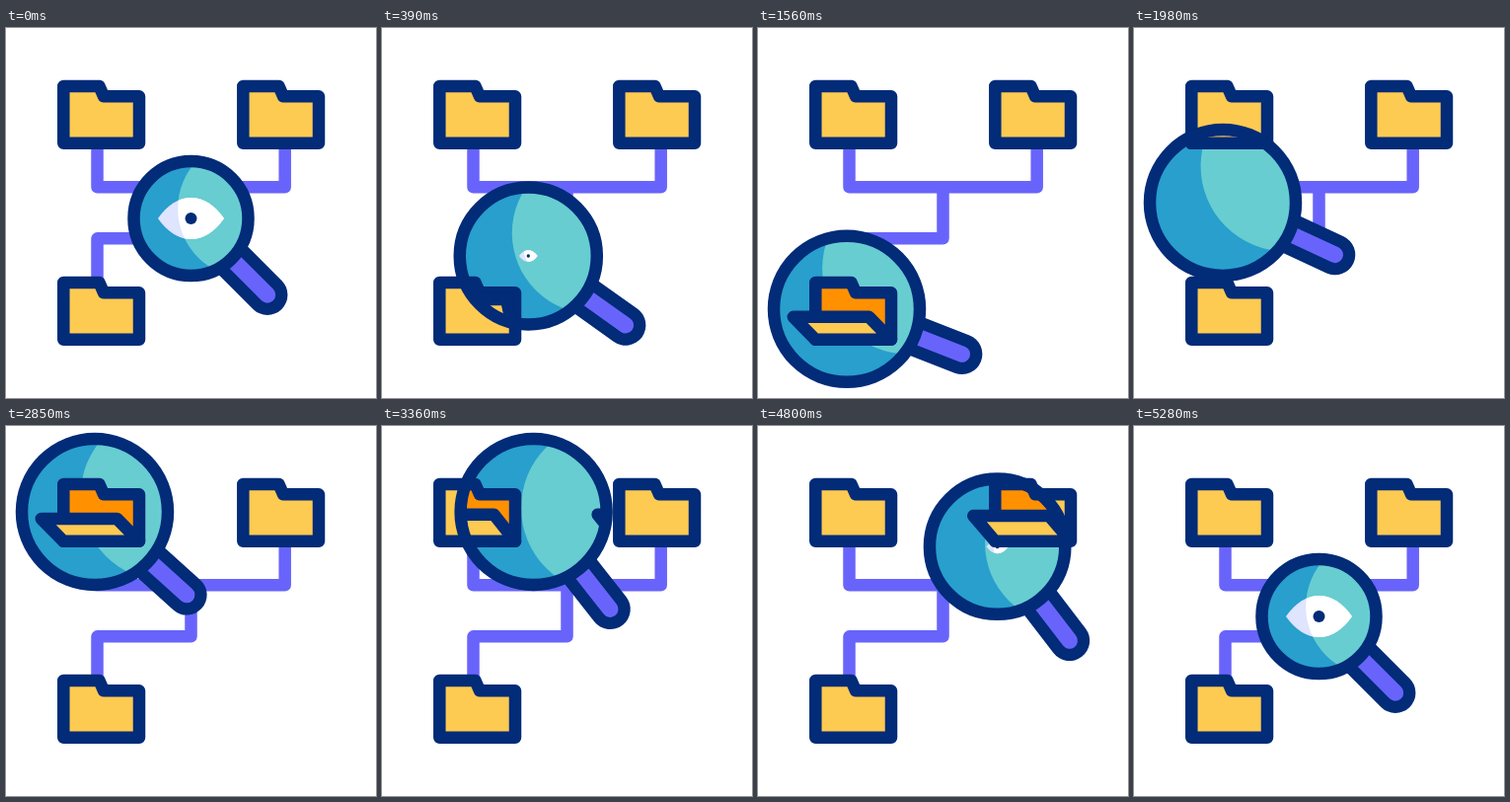
An HTML page with a canvas for the animation above (5.4 s loop, 375 by 375 pixels).

```html
<!DOCTYPE html>
<html lang="en">
<head>
<meta charset="utf-8">
<title>Folder search</title>
<style>
  html, body { margin: 0; width: 100%; height: 100%; overflow: hidden; background: #fff; }
  canvas { display: block; width: 100vw; height: 100vh; object-fit: contain; }
</style>
</head>
<body>
<canvas id="stage" width="375" height="375"></canvas>
<script>
const ctx = document.getElementById('stage').getContext('2d');
const NAVY = '#022b78', PURPLE = '#6864fb', YELLOW = '#fdca52', ORANGE = '#ff9100';
const LOOP = 5400, TICK = 30, LINE = 12.5;
const SMALL = 58, LARGE = 74;
const RAD = Math.PI / 180;

// offset, then the ticks at which the folder starts to open and to close
const folders = [
  { x: 0, y: 199, open: 3, close: 50 },
  { x: 0, y: 0, open: 55, close: 100 },
  { x: 182, y: 0, open: 90, close: 150 }
];

const folderPath = new Path2D('M58.3 59H94.5L99 69.3H135V116.8H58.3Z');
const wires = new Path2D('M92.5 116V161.3H282.7V116M187.5 161.3V213.3H92.5V255');
const eye = new Path2D('M-33.5 0C-23.5 -14 -12.5 -21 0 -21S23.5 -14 33.5 0C23.5 14 12.5 21 0 21S-23.5 14 -33.5 0Z');

function ease(t, start, length) {
  const s = Math.min(1, Math.max(0, (t - start) / length));
  return s * s * (3 - 2 * s);
}

// keys: [start, length, value reached]
function track(t, first, keys) {
  let value = first;
  for (const [start, length, to] of keys) value += (to - value) * ease(t, start, length);
  return value;
}

function circle(x, y, r) {
  const p = new Path2D();
  p.arc(x, y, r, 0, 2 * Math.PI);
  return p;
}

function fill(path, color) {
  ctx.fillStyle = color;
  ctx.fill(path);
}

function stroke(path, color, width = LINE) {
  ctx.strokeStyle = color;
  ctx.lineWidth = width;
  ctx.stroke(path);
}

function shape(path, color) {
  fill(path, color);
  stroke(path, NAVY);
}

function at(x, y, draw) {
  ctx.save();
  ctx.translate(x, y);
  draw();
  ctx.restore();
}

function drawOpenFolder(t, { open, close }) {
  const q = ease(t, open, 30) - ease(t, close, 45);
  const lean = 22.5 * Math.sin(q * Math.PI / 2);
  const top = 69.5 + 24.5 * q;
  shape(folderPath, ORANGE);
  shape(new Path2D(`M${58.3 - lean} ${top}H${135 - lean}L135 116.8H58.3Z`), YELLOW);
}

function drawEye(size, light) {
  ctx.save();
  ctx.scale(size, size);
  fill(eye, '#dfe4ff');
  fill(circle(0, 0, 6), NAVY);
  ctx.clip(light);
  fill(eye, '#fff');
  ctx.restore();
  fill(circle(0, 0, 6 * size), NAVY);
}

function drawHandle(r, angle) {
  ctx.save();
  ctx.rotate(angle * RAD);
  const bar = new Path2D(`M${r} 0H${r + 51.5}`);
  stroke(bar, NAVY, 41);
  stroke(bar, PURPLE, 16.5);
  ctx.restore();
}

function drawLens(t) {
  const x = track(t, 187.5, [[0, 30, 90], [100, 30, 270], [150, 26, 187.5]]);
  const y = track(t, 193, [[0, 30, 287.5], [50, 30, 87], [150, 26, 193]]);
  const r = track(t, SMALL, [[0, 20, LARGE], [150, 26, SMALL]]);
  const angle = track(t, 45, [[0, 30, 21.3], [50, 80, 56.3], [150, 26, 45]]);
  const glass = circle(0, 0, r);
  const tilt = (angle - 55) * RAD;
  const light = circle(r * Math.cos(tilt), r * Math.sin(tilt), r + 12.5);
  const eyeSize = (LARGE - r) / (LARGE - SMALL);

  at(x, y, () => {
    drawHandle(r, angle);
    fill(glass, '#289fcc');
    ctx.clip(glass);
    fill(light, '#67cdd1');
    if (eyeSize > 0) drawEye(eyeSize, light);
    ctx.translate(-x, -y);
    for (const f of folders) at(f.x, f.y, () => drawOpenFolder(t, f));
  });
  at(x, y, () => stroke(glass, NAVY));
}

function frame(now) {
  const t = (now % LOOP) / TICK;
  ctx.fillStyle = '#fff';
  ctx.fillRect(0, 0, 375, 375);
  ctx.lineJoin = ctx.lineCap = 'round';
  stroke(wires, PURPLE);
  for (const f of folders) at(f.x, f.y, () => shape(folderPath, YELLOW));
  drawLens(t);
  requestAnimationFrame(frame);
}
requestAnimationFrame(frame);
</script>
</body>
</html>
```
